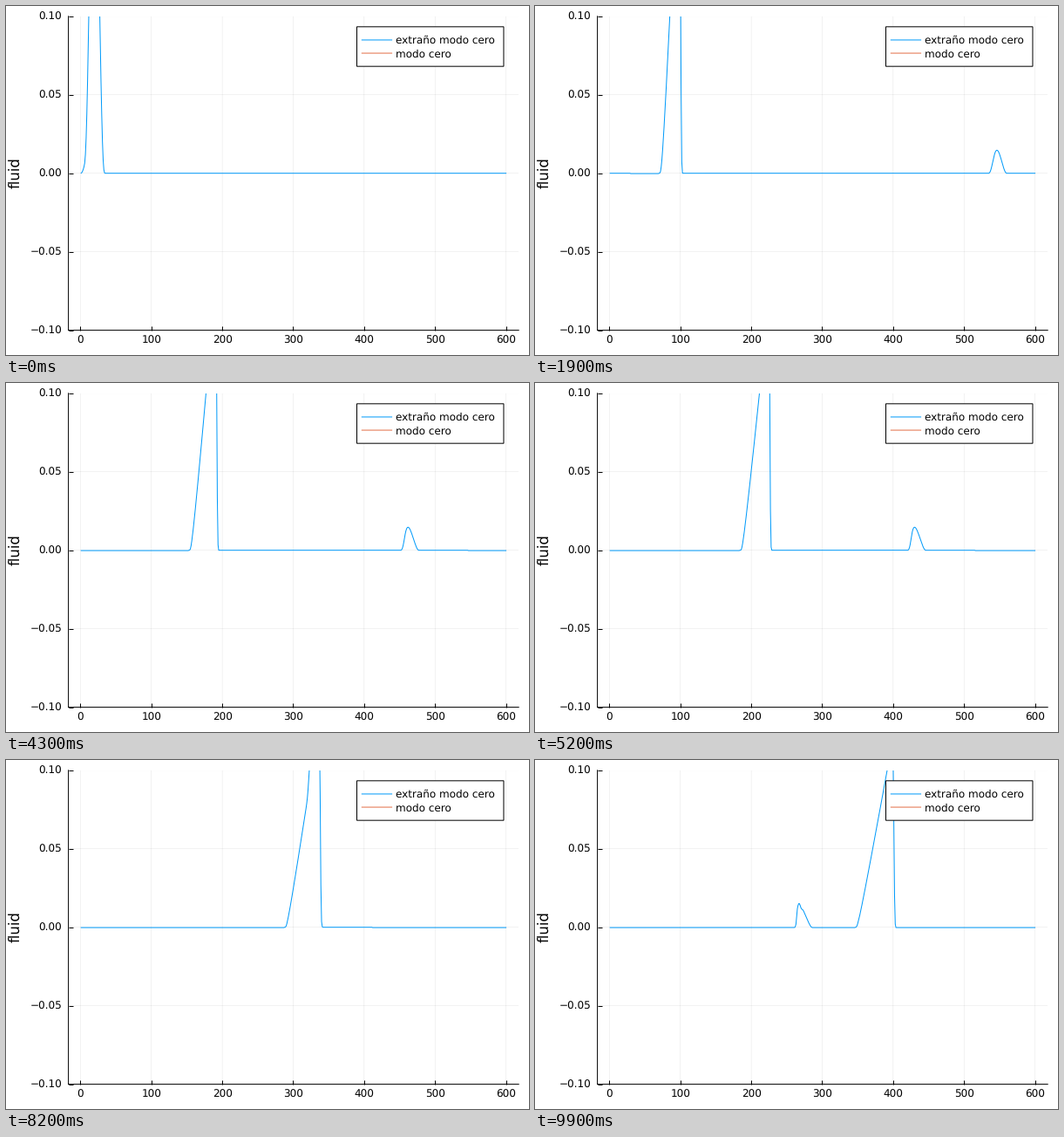
A matplotlib script for the animation above (10000 ms loop, 600 px wide and 400 px high).

```python
import numpy as np
import matplotlib.pyplot as plt
from matplotlib.animation import FuncAnimation
from matplotlib.lines import Line2D
from matplotlib.patches import Rectangle

W, H = 600, 400
PX = 0.72                     # points per pixel at 100 dpi
FRAMES = 100
BLUE, RED = "#009afa", "#e36f47"
LEFT, RIGHT, TOP, BOTTOM = 71.6, 588.19, 11.81, 371.61
C0, STEEP = 3.46, 3.7         # sound speed per frame, extra speed per height

plt.rcParams.update({
    "font.family": "DejaVu Sans",
    "path.snap": False,
    "text.hinting": "none",
})


def bell(s):
    return np.clip(1 - s**2, 0, None) ** 2.5


def burgers_rate(u):
    """Upwind MUSCL rate of u_t + (STEEP u^2 / 2)_x = 0 for u >= 0."""
    d = np.diff(u, prepend=0, append=0)
    a, b = d[:-1], d[1:]
    slope = np.where(a * b > 0, np.sign(a) * np.minimum(abs(a), abs(b)), 0)
    flux = STEEP * (u + slope / 2) ** 2 / 2
    return -np.diff(flux, prepend=0)


def steepen(u, frames, substeps=4):
    """Pulse shapes, one per frame, in the frame moving at C0."""
    dt = 1 / substeps
    shapes = []
    for _ in range(frames):
        shapes.append(np.convolve(u, [0.15, 0.7, 0.15], "same"))
        for _ in range(substeps):
            mid = u + dt * burgers_rate(u)
            u = (u + mid + dt * burgers_rate(mid)) / 2
    return shapes


x = np.arange(1, 601)
cells = np.arange(0, 91.0)
big = steepen(0.225 * bell((cells - 19.8) / 14.2), FRAMES)

s = np.linspace(-1, 1, 161)
small = 0.0147 * bell(s)


def hump(center, width):
    return np.exp(-(((x - center) / width) ** 2))


def fluid(k):
    y = np.interp(x, cells + C0 * k, big[k], left=0, right=0)

    # left-going pulse, delayed while it crosses the big one
    front = 37.7 + 3.7 * k
    pos = 613.2 + 13 * s - (C0 + 4 * small) * k
    pos = pos + 2.7 * np.clip((front - pos) / 50, 0, 1)
    for xs in (x, x + 600):
        y = y + np.interp(xs, pos, small, left=0, right=0)

    # ripple left on its flank by the crossing
    after = np.clip((k - 82) / 8, 0, 1)
    peak = pos[np.argmax(small)]
    y = y + after * (0.0008 * hump(peak, 1.5) - 0.0013 * hump(peak + 3, 1.8))

    # faint wake between the two pulses
    lo, hi = 695 - C0 * k, 604 + C0 * k
    for xs in (x, x + 600):
        y = y - 0.0002 * ((xs > lo) & (xs < hi))
    return y


fig = plt.figure(figsize=(W / 100, H / 100), dpi=100, facecolor="white")
ax = fig.add_axes([LEFT / W, 1 - BOTTOM / H,
                   (RIGHT - LEFT) / W, (BOTTOM - TOP) / H])
ax.set_xlim(-16.97, 617.97)
ax.set_ylim(-0.1, 0.1)
xticks = range(0, 601, 100)
yticks = (-0.1, -0.05, 0, 0.05, 0.1)
ax.set_xticks(xticks)
ax.set_yticks(yticks)
ax.set_axisbelow(True)
ax.grid(color="black", alpha=0.1, lw=0.5 * PX)
ax.tick_params(direction="in", length=4.72 * PX, width=PX,
               labelbottom=False, labelleft=False)
for side, spine in ax.spines.items():
    spine.set_visible(side in ("left", "bottom"))
    spine.set_linewidth(PX)


def label(px, py, text, size=12, **kw):
    fig.text(px / W, 1 - py / H, text, fontsize=size * PX,
             va="baseline", zorder=12, **kw)


def segment(x0, x1, py, color):
    fig.add_artist(Line2D([x0 / W, x1 / W], [1 - py / H] * 2,
                          color=color, lw=PX, zorder=11))


for v in xticks:
    label(85.4 + 0.8136 * v, 387, str(v), ha="center")
for v in yticks:
    label(64.4, 191.7 - 1799 * v + 4.3,
          f"{v:.2f}".replace("-", "\u2212"), ha="right")
label(16.3, 191.2, "fluid", 16.5, ha="center", rotation=90,
      rotation_mode="anchor")

fig.add_artist(Rectangle((402.5 / W, 1 - 69.17 / H), 168.47 / W, 45.36 / H,
                         fc="white", ec="black", lw=PX, zorder=10))
for py, color, text in ((38.94, BLUE, "extraño modo cero"),
                        (54.06, RED, "modo cero")):
    segment(408.3, 442.6, py, color)
    label(447, py + 4.32, text)

curve, = ax.plot(x, fluid(0), color=BLUE, lw=PX)


def update(k):
    curve.set_ydata(fluid(k))
    return curve,


anim = FuncAnimation(fig, update, frames=FRAMES, interval=100,
                     repeat=True, repeat_delay=0)
plt.show()
```
